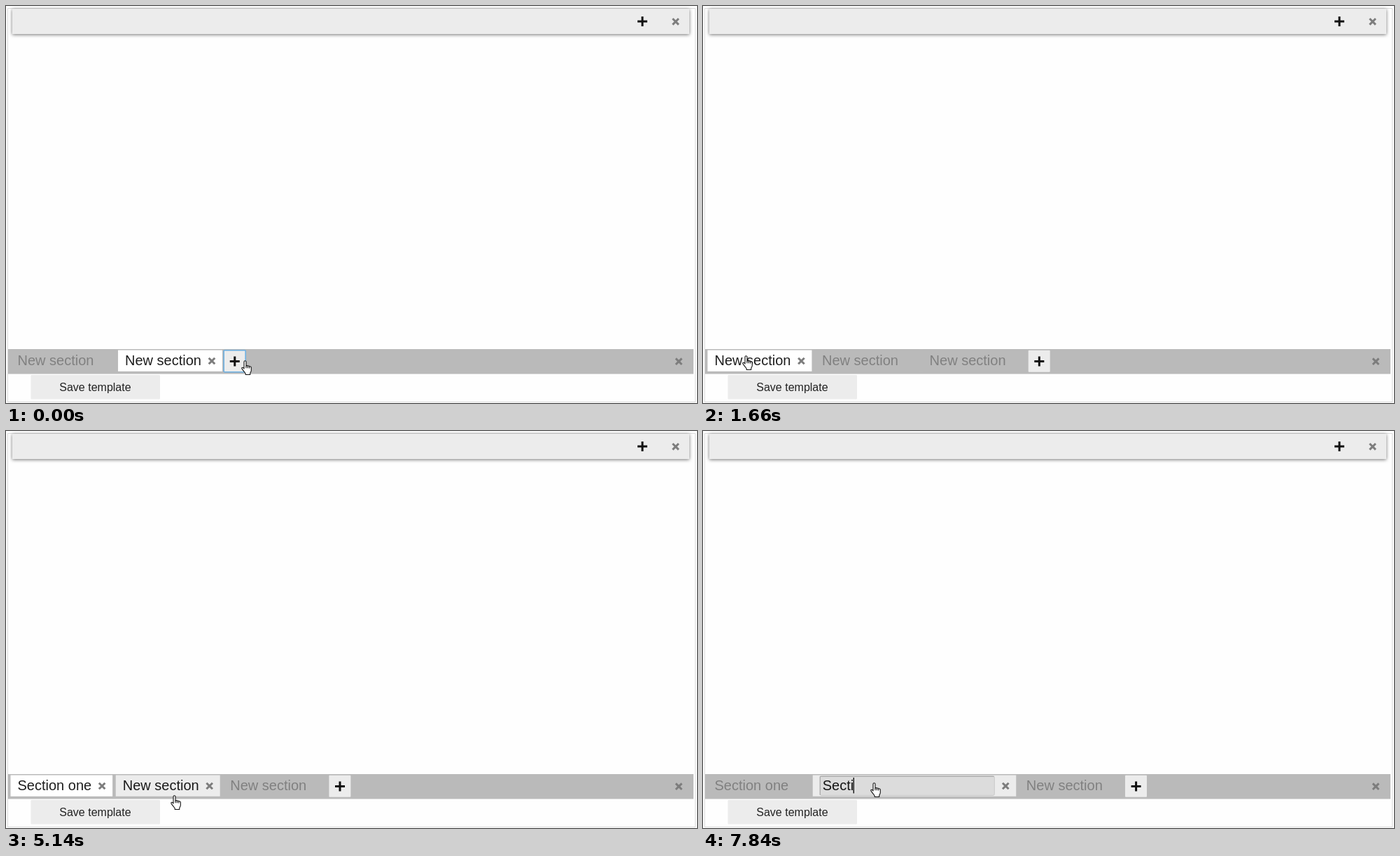
Animation, 987 px wide and 567 px high, one loop 8000 ms. Source, as an HTML page:

```html
<!DOCTYPE html>
<html lang="en">
<head>
<meta charset="utf-8">
<title>Section tabs</title>
<style>
  html, body { margin: 0; width: 100%; height: 100%; overflow: hidden; background: #fefefe; }
  svg { display: block; width: 987px; height: 567px; }
  text { font: 20px "Liberation Sans", Arial, sans-serif; white-space: pre; }
  .save { font-size: 16px; fill: #222; }
  .plus { stroke: #111; stroke-width: 3; fill: none; }
  .cross { stroke: #7d7d7d; stroke-width: 3; fill: none; }
  .header { filter: drop-shadow(0 1px 2.5px rgba(0, 0, 0, .55)); }
</style>
</head>
<body>
<svg viewBox="0 0 987 567">
  <defs>
    <path id="plus" class="plus" d="M-7 0H7M0-7V7"/>
    <path id="cross" class="cross" d="M-4.3-4.3L4.3 4.3M4.3-4.3L-4.3 4.3"/>
  </defs>
  <rect x="2.5" y="3.5" width="982" height="562" fill="#fefefe" stroke="#dcdcdc"/>
  <rect class="header" x="9" y="4" width="967" height="36" fill="#ececec"/>
  <use href="#plus" x="909" y="22"/>
  <use href="#cross" x="956.5" y="22.3"/>
  <rect x="3" y="490" width="979" height="35.5" fill="#bababa"/>
  <use href="#cross" x="961" y="507.7"/>
  <rect x="35.5" y="527" width="184.5" height="34.5" rx="1" fill="#ececec"/>
  <text class="save" x="76.3" y="550">Save template</text>
  <g id="tabs"></g>
  <g id="hand" stroke="#111" stroke-width="1.1" stroke-linejoin="round">
    <path fill="#fff" d="M4 2.2a1.5 1.5 0 0 1 3 0V8c.6-.6 2-.5 2.4.3.8-.5 2-.3 2.3.6.9-.4 2.6 0 2.6 1.3V14.5c0 2-1.6 3-1.6 4.5V20.5H6.2V19C5 17 2.5 14.5 1 12c-.6-1.2.6-2.3 1.8-1.4L4 12Z"/>
    <path fill="none" d="M7 8v3.3M9.4 8.5v2.8M11.7 9v2.5"/>
  </g>
</svg>
<script>
const LOOP = 8000, FADE = 90, GAP = 4.6, BLANK = 'New section';
const tabLayer = document.getElementById('tabs');
const hand = document.getElementById('hand');
const pen = document.createElement('canvas').getContext('2d');
pen.font = '20px "Liberation Sans", Arial, sans-serif';
const measure = text => pen.measureText(text).width;
const mix = (a, b, k) => a + (b - a) * k;

// Grey level of the background, grey level of the label, opacity of the cross
const idle = [186, 128, 0], hover = [236, 26, 1], active = [255, 30, 1];

const tabs = [
  {
    born: 0,
    looks: [[0, idle], [690, hover], [1230, active], [1730, hover, 1], [4990, active], [5830, idle]],
    name: 'Section one', opens: 1730, closes: 4370,
    keys: [2330, 2580, 2660, 3080, 3230, 3430, 3520, 3610, 3700, 3910, 4110]
  },
  {
    born: 0,
    looks: [[0, active], [60, idle], [400, hover], [680, idle], [5030, hover], [5840, active], [6169, hover, 1]],
    name: 'Section two', opens: 6170, closes: Infinity,
    keys: [6970, 7250, 7320, 7650, 7840]
  },
  { born: 60, looks: [[0, active], [1010, idle]], opens: Infinity }
];

// Time, left and top of the pointer
const route = [
  [30, 336, 506], [250, 322, 505], [670, 135, 492], [820, 57, 490], [1010, 57, 490],
  [1035, 46, 476], [1070, 50, 486], [1460, 50, 486], [1650, 56, 499], [4960, 56, 499],
  [5140, 235, 520], [5250, 239, 521], [5600, 239, 502]
];

function pointerAt(t) {
  const next = route.findIndex(p => p[0] > t);
  if (next === 0) return route[0].slice(1);
  if (next < 0) return route[route.length - 1].slice(1);
  const [a, b] = [route[next - 1], route[next]];
  const k = (t - a[0]) / (b[0] - a[0]);
  return [mix(a[1], b[1], k), mix(a[2], b[2], k)];
}

function lookAt(looks, t) {
  const i = looks.filter(l => l[0] <= t).length - 1;
  const [start, to, fade = FADE] = looks[i];
  if (i === 0) return to;
  const k = Math.min(1, (t - start) / fade);
  return looks[i - 1][1].map((v, n) => mix(v, to[n], k));
}

const grey = v => `rgb(${v},${v},${v})`;
const rect = (x, y, w, h, fill, more = '') =>
  `<rect x="${x}" y="${y}" width="${w}" height="${h}" fill="${fill}" ${more}/>`;
const label = (x, text, fill) => `<text x="${x}" y="513" fill="${fill}">${text}</text>`;

function field(x, text, selected) {
  const width = measure(text), textX = x + 4;
  return rect(x + .5, 493, 249, 27.5, '#dcdcdc', 'rx="2" stroke="#c8c8c8"')
    + `<path d="M${x + .5} 520V493.3H${x + 249}" fill="none" stroke="#a2a2a2"/>`
    + (selected ? rect(textX, 494, width, 24, '#a0cbe9') : '')
    + label(textX, text, '#151515')
    + (selected ? '' : rect(textX + width - .6, 495, 1.3, 22.5, '#000'));
}

function drawTabs(t) {
  let x = 6.5, end = x, out = '';
  for (const tab of tabs) {
    if (t < tab.born) continue;
    const editing = t >= tab.opens && t < tab.closes;
    const text = t >= tab.closes ? tab.name : BLANK;
    const width = editing ? 290.5 : measure(text) + 40;
    const [back, ink, cross] = lookAt(tab.looks, t);
    out += rect(x, 491.5, width, 30.3, grey(back));
    if (editing) {
      const typed = tab.keys.filter(k => k <= t).length;
      out += field(x + 10, typed ? tab.name.slice(0, typed) : BLANK, !typed);
    } else {
      out += label(x + 10, text, grey(ink));
    }
    out += `<use href="#cross" x="${x + width - 15}" y="507" opacity="${cross}"/>`;
    end = x + width;
    x = end + GAP;
  }
  const outline = t < 1040 ? 'stroke="#6cb0e2" stroke-width="1.6"' : '';
  return out + rect(end + 2.2, 491.7, 31, 31, '#ececec', 'rx="1" ' + outline)
    + `<use href="#plus" x="${end + 17.8}" y="507.5"/>`;
}

let shown = '';
function frame(now) {
  const t = now % LOOP;
  const markup = drawTabs(t);
  if (markup !== shown) tabLayer.innerHTML = shown = markup;
  hand.setAttribute('transform', `translate(${pointerAt(t)})`);
  requestAnimationFrame(frame);
}
frame(0);
</script>
</body>
</html>
```
